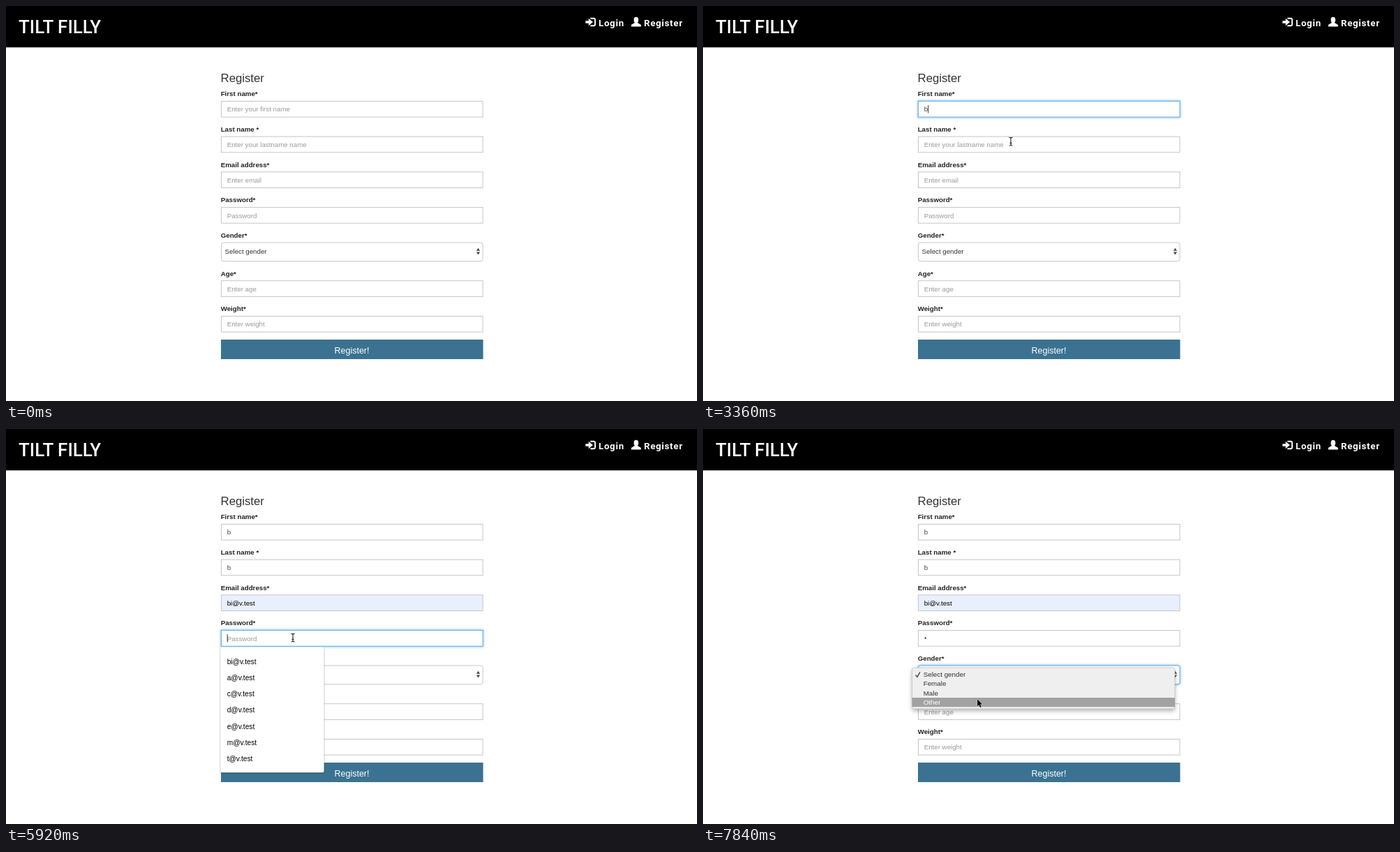
An HTML page for the animation above (8 s loop, 990 px wide and 566 px high).

```html
<!DOCTYPE html>
<html lang="en">
<head>
<meta charset="utf-8">
<title>Registration form</title>
<style>
  html, body { margin: 0; width: 100%; height: 100%; overflow: hidden; background: #fff; }
  svg { display: block; width: 990px; height: 566px; font-family: "Liberation Sans", Arial, sans-serif; }
  text { white-space: pre; }
  .nav { font: bold 13.2px Roboto, sans-serif; letter-spacing: .75px; fill: #fff; }
  .brand { font: 500 26px Roboto, sans-serif; fill: #fff; }
</style>
</head>
<body>
<svg id="stage" viewBox="0 0 990 566">
  <defs>
    <filter id="glow" x="-5%" y="-60%" width="110%" height="220%"><feGaussianBlur stdDeviation="1.4"/></filter>
    <filter id="soft" x="-10%" y="-40%" width="120%" height="180%"><feGaussianBlur stdDeviation="3"/></filter>
    <filter id="edge" x="-10%" y="-40%" width="120%" height="180%"><feGaussianBlur stdDeviation=".9"/></filter>
  </defs>
  <rect width="990" height="566" fill="#fff"/>
  <rect width="990" height="59.3" fill="#000"/>
  <text class="brand" x="18" y="39">TILT FILLY</text>
  <path d="M837.3 17.7H842a2 2 0 0 1 2 2v6.6a2 2 0 0 1-2 2h-4.7" fill="none" stroke="#fff" stroke-width="1.9"/>
  <path d="M830.3 21.2h4.4v-3.4l6.2 5.2-6.2 5.2v-3.4h-4.4z" fill="#fff"/>
  <text class="nav" x="849" y="28.6">Login</text>
  <ellipse cx="902.8" cy="20" rx="3.3" ry="4.3" fill="#fff"/>
  <path d="M895.8 29.6v-2q.3-1.2 2-1.9 3.5-1.3 3.6-3h2.8q.1 1.7 3.6 3 1.7.7 2 1.9v2z" fill="#fff"/>
  <text class="nav" x="914" y="28.6">Register</text>
  <text x="307.6" y="109" font-size="16.7" fill="#333">Register</text>
  <g id="form"></g>
  <rect x="308" y="478" width="375.6" height="28" fill="#3b7291"/>
  <text x="495.5" y="498" font-size="12.5" fill="#fff" text-anchor="middle">Register!</text>
  <g id="popup"></g>
  <g id="menu"></g>
  <g id="pointer">
    <circle id="ring" r="12.8" fill="none" stroke="#111" stroke-width="1.1"/>
    <path id="arrow" d="M-2.6-5.8v10l2.3-2 1.6 3.7 1.6-.7L1.3 1.6h3z" fill="#000" stroke="#fff" stroke-width=".7" paint-order="stroke"/>
    <g id="beam" fill="none">
      <path d="M-2.6-5.6Q0-5.6 0-4.2Q0-5.6 2.6-5.6M0-4.2V4.6M-2.6 6Q0 6 0 4.6Q0 6 2.6 6M-1.4 2.4H1.4" stroke="#222" stroke-width="1.1"/>
    </g>
  </g>
</svg>
<script>
const LOOP = 8000, STEP = 160, SIZE = 9.73, LEFT = 308, WIDTH = 375.5;
const byId = id => document.getElementById(id);
const MAIL = "bi@v.test";

function add(parent, tag, attrs, content) {
  const node = document.createElementNS("http://www.w3.org/2000/svg", tag);
  for (const key in attrs) node.setAttribute(key, attrs[key]);
  if (content !== undefined) node.textContent = content;
  parent.appendChild(node);
  return node;
}
const show = (node, on) => node.setAttribute("visibility", on ? "visible" : "hidden");

// typed: [time, text]; focus: [from, to]
const fields = [
  { label: "First name*", hint: "Enter your first name", top: 136, focus: [2240, 3840], typed: [[2880, "b"]] },
  { label: "Last name *", hint: "Enter your lastname name", top: 186.7, focus: [3840, 4800], typed: [[4000, "b"]] },
  { label: "Email address*", hint: "Enter email", top: 237.4, focus: [4800, 5760], typed: [[5120, "b"], [5600, MAIL]] },
  { label: "Password*", hint: "Password", top: 288.1, focus: [5760, 7360], typed: [[6080, "•"]] },
  { label: "Gender*", hint: "Select gender", top: 338.6, focus: [7200, LOOP], select: true },
  { label: "Age*", hint: "Enter age", top: 393.3 },
  { label: "Weight*", hint: "Enter weight", top: 444 }
];

function buildField(f) {
  const g = byId("form");
  f.height = f.select ? 27.6 : 23.5;
  const box = {
    x: LEFT + .4, y: f.top + .4, width: WIDTH - .8, height: f.height - .8, rx: f.select ? 3 : 0
  };
  add(g, "text", { x: 307.7, y: f.top - 6.8, "font-size": SIZE, "font-weight": "bold", fill: "#222" }, f.label);
  f.glow = add(g, "rect", { ...box, fill: "none", stroke: "#66afe9", "stroke-width": 2.6, filter: "url(#glow)" });
  f.box = add(g, "rect", { ...box, fill: "#fff", stroke: "#c3c3c3", "stroke-width": .95 });
  f.text = add(g, "text", { x: f.select ? 313.6 : 316.7, y: f.top + (f.select ? 16.8 : 15.4), "font-size": SIZE });
  f.dot = add(g, "circle", { cx: 318.7, cy: f.top + 11.4, r: 1.25, fill: "#444" });
  f.caret = add(g, "rect", { y: f.top + 6, width: .9, height: 11.4, fill: "#222" });
  if (f.select) {
    add(g, "path", { d: "M673.9 350.7l2.6-4 2.6 4zM673.9 352.6l2.6 4 2.6-4z", fill: "#444" });
  }
}
fields.forEach(buildField);

const names = ["a", "c", "demo", "test", "user"];
const mails = [MAIL, "a@v.test", "c@v.test", "d@v.test", "e@v.test", "m@v.test", "t@v.test"];
const popups = [
  { field: 0, from: 2400, to: 2880, rows: names },
  { field: 1, from: 3840, to: 4000, rows: names },
  { field: 2, from: 4960, to: 5120, rows: mails.slice(0, 3) },
  { field: 2, from: 5120, to: 5600, rows: mails.slice(0, 1) },
  { field: 3, from: 5920, to: 6080, rows: mails }
];
for (const p of popups) {
  const f = fields[p.field], top = f.top + f.height + 1;
  const box = { x: 307.2, y: top, width: 148.4, height: 39.8 + 23.3 * (p.rows.length - 1), rx: 2 };
  p.node = add(byId("popup"), "g", {});
  add(p.node, "rect", { ...box, y: top + .8, fill: "#000", opacity: .38, filter: "url(#edge)" });
  add(p.node, "rect", { ...box, fill: "#fff" });
  p.rows.forEach((row, i) =>
    add(p.node, "text", { x: 316.7, y: top + 23.9 + 23.3 * i, "font-size": 10.2, fill: "#000" }, row));
}

const menu = byId("menu"), ROW = 13.2, MENU_TOP = 345.4;
const menuBox = { x: 299.5, y: 342, width: 376.5, height: 59, rx: 3 };
add(menu, "rect", { ...menuBox, y: 345, fill: "#000", opacity: .3, filter: "url(#soft)" });
add(menu, "rect", { ...menuBox, fill: "#efefef", stroke: "#bbb", "stroke-width": .6 });
const bar = add(menu, "rect", { x: 299.5, width: 376.5, height: ROW, fill: "#a2a2a2" });
const tick = add(menu, "path", { d: "M304.6 352.4l2.3 3 4-7", fill: "none", "stroke-width": 1.2 });
const options = ["Select gender", "Female", "Male", "Other"].map((name, i) =>
  add(menu, "text", { x: 315.7, y: MENU_TOP + 9.8 + ROW * i, "font-size": 9.8 }, name));

// time, x, y
const path = [
  [160, 582, 65], [1120, 475, 346], [1280, 475, 376], [1440, 454, 177], [1600, 452, 152],
  [1920, 451, 139], [2720, 451, 139], [2880, 450, 141], [3360, 441, 194], [3680, 440, 198],
  [3840, 440, 198], [4160, 433, 250], [4480, 428, 253], [4960, 426, 252], [5280, 424, 261],
  [5600, 415, 282], [5920, 411, 299], [6240, 411, 299], [6400, 410, 304], [6880, 405, 340],
  [7200, 403.6, 362], [7360, 402, 362], [7520, 400, 366], [7840, 395.8, 393]
];

function pointerAt(t) {
  const i = path.findIndex(p => p[0] >= t);
  if (i < 0) return path[path.length - 1].slice(1);
  if (i === 0) return path[0].slice(1);
  const a = path[i - 1], b = path[i], k = (t - a[0]) / (b[0] - a[0]);
  return [a[1] + (b[1] - a[1]) * k, a[2] + (b[2] - a[2]) * k];
}

function drawField(f, t) {
  const [from, to] = f.focus || [Infinity, Infinity];
  const level = t < from || t >= to ? 0 : f.select && t - from < STEP ? .5 : 1;
  const value = (f.typed || []).filter(e => e[0] <= t).map(e => e[1]).pop() || "";
  const filled = value === MAIL, secret = value === "•";
  f.glow.setAttribute("opacity", level * .75);
  f.box.setAttribute("stroke", level === 1 ? "#5aaae8" : level ? "#a9bfd6" : "#c3c3c3");
  f.box.setAttribute("fill", filled ? "#e8f0fe" : "#fff");
  f.text.textContent = secret ? "" : value || f.hint;
  f.text.setAttribute("fill", filled ? "#000" : value ? "#444" : f.select ? "#333" : "#999");
  show(f.dot, secret);
  f.caret.setAttribute("x", value && !secret ? 316.9 + f.text.getComputedTextLength() : secret ? 320.6 : 316.7);
  show(f.caret, level && !f.select && (t - from) % 960 < 480);
}

function drawMenu(t) {
  show(menu, t >= 7360);
  const chosen = Math.max(0, Math.min(3, Math.floor((t - 7360) / STEP)));
  bar.setAttribute("y", MENU_TOP + ROW * chosen);
  tick.setAttribute("stroke", chosen ? "#333" : "#fff");
  options.forEach((o, i) => o.setAttribute("fill", i === chosen ? "#fff" : "#333"));
}

function drawPointer(t) {
  const [x, y] = pointerAt(t);
  const inMenu = t >= 7360;
  const overPopup = t >= 5440 && t < 5760;
  const overInput = !overPopup && fields.some(f => !f.select && y >= f.top && y <= f.top + f.height + .5);
  byId("pointer").setAttribute("transform", `translate(${x} ${y})`);
  show(byId("pointer"), t >= STEP);
  byId("beam").setAttribute("opacity", overInput && !inMenu ? 1 : 0);
  byId("arrow").setAttribute("opacity", overInput && !inMenu ? 0 : 1);
  byId("ring").setAttribute("opacity", overInput || inMenu ? 0 : 1);
}

function draw(time) {
  const t = Math.floor(time % LOOP / STEP) * STEP;
  fields.forEach(f => drawField(f, t));
  popups.forEach(p => show(p.node, t >= p.from && t < p.to));
  drawMenu(t);
  drawPointer(t);
}

let start = null;
function tickFrame(now) {
  if (start === null) start = now;
  draw(now - start);
  requestAnimationFrame(tickFrame);
}
draw(0);
requestAnimationFrame(tickFrame);
</script>
</body>
</html>
```
